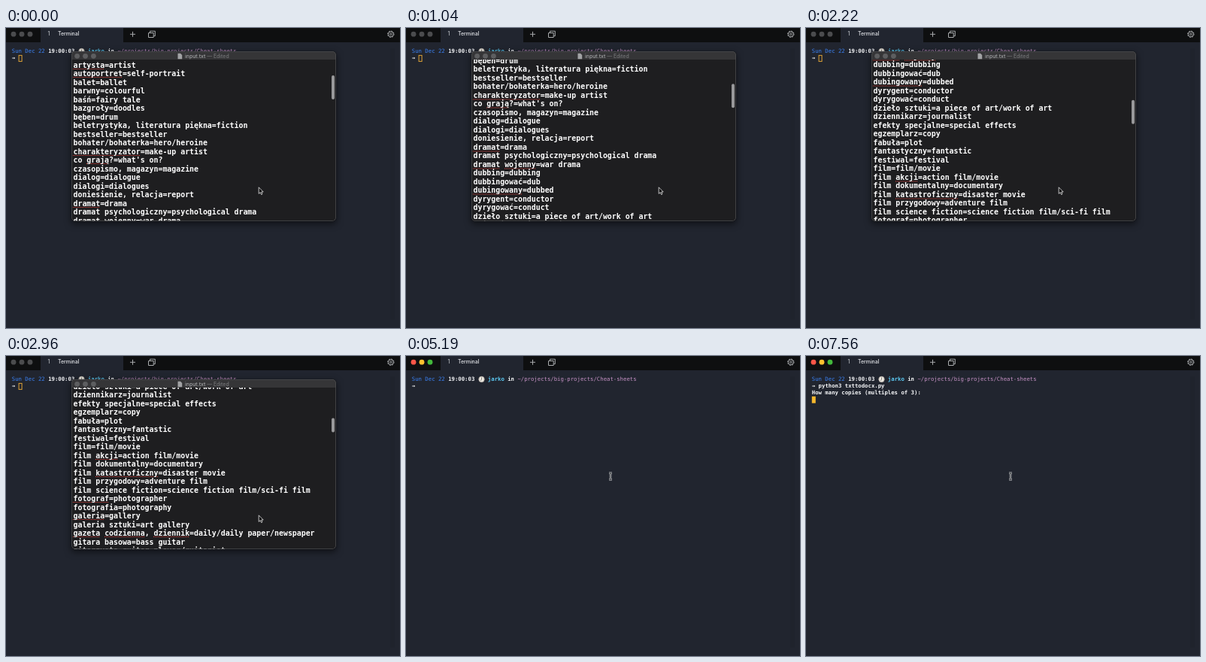
An HTML page for the animation above (8000 ms loop, 524 px wide and 399 px high).

```html
<!DOCTYPE html>
<html lang="en">
<head>
<meta charset="utf-8">
<title>Terminal</title>
<style>
html, body { margin: 0; width: 100%; height: 100%; overflow: hidden; background: #21252f; }
#stage { position: relative; width: 524px; height: 399px; overflow: hidden; background: #21252f; }
#stage > *, #editor > * { position: absolute; }
svg { left: 0; top: 0; overflow: visible; }
.ui { font: 500 6.9px/10px Inter, sans-serif; white-space: pre; }
#bar { left: 0; top: 0; width: 524px; height: 18.5px; background: #0e0f10; }
#tab { left: 46px; top: 0; width: 109.5px; height: 19px; background: #21252f; }
#track { left: 511px; top: 27px; width: 6px; height: 361px; background: #1f232c; }
#lights { fill: #4b4c4e; }
.active #lights circle:nth-child(1) { fill: #fe5648; }
.active #lights circle:nth-child(2) { fill: #fec02e; }
.active #lights circle:nth-child(3) { fill: #43b93c; }

.line { left: 7.8px; height: 8.9px; white-space: pre; color: #f4f5f7;
  font: bold 7.3px/8.9px "DejaVu Sans Mono", monospace; }
.line i { font-style: normal; font-weight: normal; }
.date { color: #3b80f2; }
.user { color: #5cc9f2; }
.path { color: #c490c3; }
#block { width: 4.6px; height: 9px; box-sizing: border-box; border: 1px solid #e0a336; }
.active #block { border: 0; background: #f7b92d; }

#editor { left: 87px; top: 31px; width: 351.5px; height: 226px; border-radius: 5px; overflow: hidden;
  background: #1e1e20; }
#shadow { left: 87px; top: 31px; width: 351.5px; height: 226px; border-radius: 5px;
  box-shadow: 0 3px 8px 1px rgba(0, 0, 0, .5), 0 0 1px #000; }
#frame { inset: 0; border-radius: 5px; box-shadow: inset 0 0 0 .8px #4b4c4e; }
#title { left: 0; top: 0; width: 100%; height: 11px; background: #353537; }
#view { left: 0; top: 11px; width: 100%; height: 215px; overflow: hidden; }
#rows { padding: 1.5px 0 0 2.5px; white-space: pre; color: #fff;
  font: bold 9.9px/11.5px "DejaVu Sans Mono", monospace; }
#rows div { height: 11.5px; }
#rows u { text-decoration: underline dotted #e2453f 1px; text-underline-offset: 1px; text-decoration-skip-ink: none; }
#thumb { left: 346.2px; top: 0; width: 4.2px; border-radius: 2px; background: #98989a; }
.active #editor, .active #shadow { display: none; }
</style>
</head>
<body>
<div id="stage">
  <div id="bar"></div>
  <div id="tab"></div>
  <div id="track"></div>
  <span class="ui" style="left:55.5px;top:3.2px;color:#b9bcc2">1</span>
  <span class="ui" style="left:69px;top:3.2px;color:#e3e5e9">Terminal</span>
  <svg width="524" height="19" fill="none" stroke="#a9abad" stroke-width="1">
    <g id="lights" stroke="none">
      <circle cx="10" cy="8.2" r="3.4"/><circle cx="21" cy="8.2" r="3.4"/><circle cx="32" cy="8.2" r="3.4"/>
    </g>
    <path d="M165 8.3H172M168.5 4.8V11.8"/>
    <path d="M189.5 6.5H196.2V12.5H189.5ZM191.5 6V4.2H198.3V10.6H196.5"/>
    <circle cx="511.8" cy="8.2" r="3.5"/>
    <circle cx="511.8" cy="8.2" r="1.3" stroke-width=".9"/>
    <circle cx="511.8" cy="8.2" r="4.2" stroke-width="1" stroke-dasharray="1.65"/>
  </svg>

  <div class="line" style="top:27px"><i class="date">Sun Dec 22</i> 19:00:03    <span class="user">jarko</span> in <i class="path">~/projects/big-projects/Cheat-sheets</i></div>
  <svg width="524" height="50" fill="none">
    <circle cx="100.5" cy="31" r="3.7" fill="#efece4" stroke="#b5aea6" stroke-width=".9"/>
    <path d="M100.5 28.4V31L99.4 32.8" stroke="#56504c" stroke-width=".7"/>
  </svg>
  <div class="line" style="top:35.9px">→ <span id="command"></span></div>
  <div class="line" style="top:44.8px" id="question"></div>
  <div id="block"></div>

  <div id="shadow"></div>
  <div id="editor">
    <div id="view"><div id="rows"></div></div>
    <div id="title"></div>
    <svg width="351" height="11">
      <g fill="#5d5e60"><circle cx="7.6" cy="6.3" r="3.4"/><circle cx="18.5" cy="6.3" r="3.4"/><circle cx="29.4" cy="6.3" r="3.4"/></g>
      <path d="M141.5 2.8H145L147.2 5V10.2H141.5Z" fill="#a2a3a5"/>
    </svg>
    <span class="ui" style="left:151px;top:1.5px;color:#a3a4a6">input.txt<span style="color:#737476"> — Edited</span></span>
    <div id="thumb"></div>
    <div id="frame"></div>
  </div>

  <svg width="8" height="12" id="arrow"><path d="M0 0V8.6L2 6.8L3.3 9.7L4.7 9.1L3.4 6.2H6Z" fill="#0b0b0c" stroke="#eee" stroke-width=".8"/></svg>
  <svg width="8" height="12" id="beam" fill="none">
    <path d="M-2 -4.2H2M-2 4.2H2M0 -4.2V4.2" stroke="#d5d7da" stroke-width="2.4"/>
    <path d="M-2 -4.2H2M-2 4.2H2M0 -4.2V4.2" stroke="#15171c" stroke-width=".9"/>
  </svg>
</div>

<script>
const LOOP = 8000, TICKS = 54;
const LEAD = 5; // ms, keeps tick edges ahead of times rounded to 10 ms
const $ = id => document.getElementById(id);

// Words between underscores carry the spelling mark.
const words = `_artysta_=artist
_autoportret_=self-portrait
balet=ballet
barwny=colourful
baśń=fairy tale
bazgroły=doodles
bęben=drum
beletrystyka, literatura piękna=fiction
bestseller=bestseller
bohater/bohaterka=hero/heroine
_charakteryzator_=make-up artist
co _grają_?=what's on?
czasopismo, magazyn=magazine
dialog=dialogue
dialogi=dialogues
doniesienie, relacja=report
_dramat_=drama
dramat psychologiczny=psychological drama
_dramat_ _wojenny_=war drama
dubbing=dubbing
dubbingować=dub
_dubingowany_=dubbed
dyrygent=conductor
dyrygować=conduct
dzieło sztuki=a piece of art/work of art
dziennikarz=journalist
efekty specjalne=special effects
egzemplarz=copy
fabuła=plot
fantastyczny=fantastic
festiwal=festival
film=film/movie
film _akcji_=action film/movie
film dokumentalny=documentary
film _katastroficzny_=disaster movie
film przygodowy=adventure film
film science fiction=science fiction film/sci-fi film
_fotograf_=photographer
fotografia=photography
_galeria_=gallery
galeria sztuki=art gallery
_gazeta_ _codzienna_, _dziennik_=daily/daily paper/newspaper
gitara basowa=bass guitar
gitarzysta=guitar player/guitarist
główny bohater=main character
główny wokalista=lead vocalist
_gospodarz_ talk show=talk show host
_gra_ _aktorska_=acting
_grać_=act
_grać_=play`;
$('rows').innerHTML = words.split('\n')
  .map(w => `<div>${w.replace(/_(.+?)_/g, '<u>$1</u>')}</div>`).join('');

// Scroll gestures: first tick, steps, start and end offset.
const gestures = [[1, 5, 0, 66.4], [7, 7, 66.4, 213.2], [15, 6, 213.2, 285], [22, 5, 285, 360]];
const smooth = p => p * p * (3 - 2 * p);

function scrollAt(tick) {
  let y = 0;
  for (const [first, steps, from, to] of gestures) {
    if (tick >= first) y = from + (to - from) * smooth(Math.min(1, (tick - first + 1) / steps));
  }
  return y;
}

// Latest entry [tick, ...values] that has begun.
const latest = (track, tick) => track.filter(e => e[0] <= tick).pop().slice(1);
const pointer = [[0, 336.2, 211.8], [25, 425, 305], [26, 498.6, 379.3], [27, 507, 385], [28, 269, 155],
  [32, 270, 158], [33, 272, 160]];
// Block cursor: column, row, visible.
const caret = [[0, 2, 1, 1], [35, 2, 1, 0], [39, 2, 1, 1], [43, 22, 1, 1], [47, 22, 1, 0],
  [49, 0, 2, 1], [51, 0, 3, 1]];

function place(el, x, y) { el.style.transform = `translate(${x}px, ${y}px)`; }

function render(tick) {
  const y = scrollAt(tick);
  place($('rows'), 0, -y);
  const grown = tick >= 18;
  $('thumb').style.height = (grown ? 19 : 32) + 'px';
  place($('thumb'), 0, grown ? 51.5 + (y - 285) * .1 : 32 + y * .15);

  $('stage').classList.toggle('active', tick >= 31);
  const [px, py] = latest(pointer, tick), isBeam = tick >= 32;
  place($('arrow'), px, py);
  place($('beam'), px, py);
  $('arrow').style.display = isBeam ? 'none' : '';
  $('beam').style.display = isBeam ? '' : 'none';

  const [col, row, on] = latest(caret, tick);
  place($('block'), 7.8 + col * 4.395, 27 + row * 8.9);
  $('block').style.visibility = on ? 'visible' : 'hidden';
  $('command').textContent = tick >= 43 ? 'python3 txttodocx.py' : '';
  $('question').textContent = tick >= 51 ? 'How many copies (multiples of 3):' : '';
}

const start = performance.now();
let shown = -1;
function frame() {
  const t = (performance.now() - start + LEAD) % LOOP;
  const tick = Math.floor(t / LOOP * TICKS);
  if (tick !== shown) render(shown = tick);
  requestAnimationFrame(frame);
}
frame();
</script>
</body>
</html>
```
